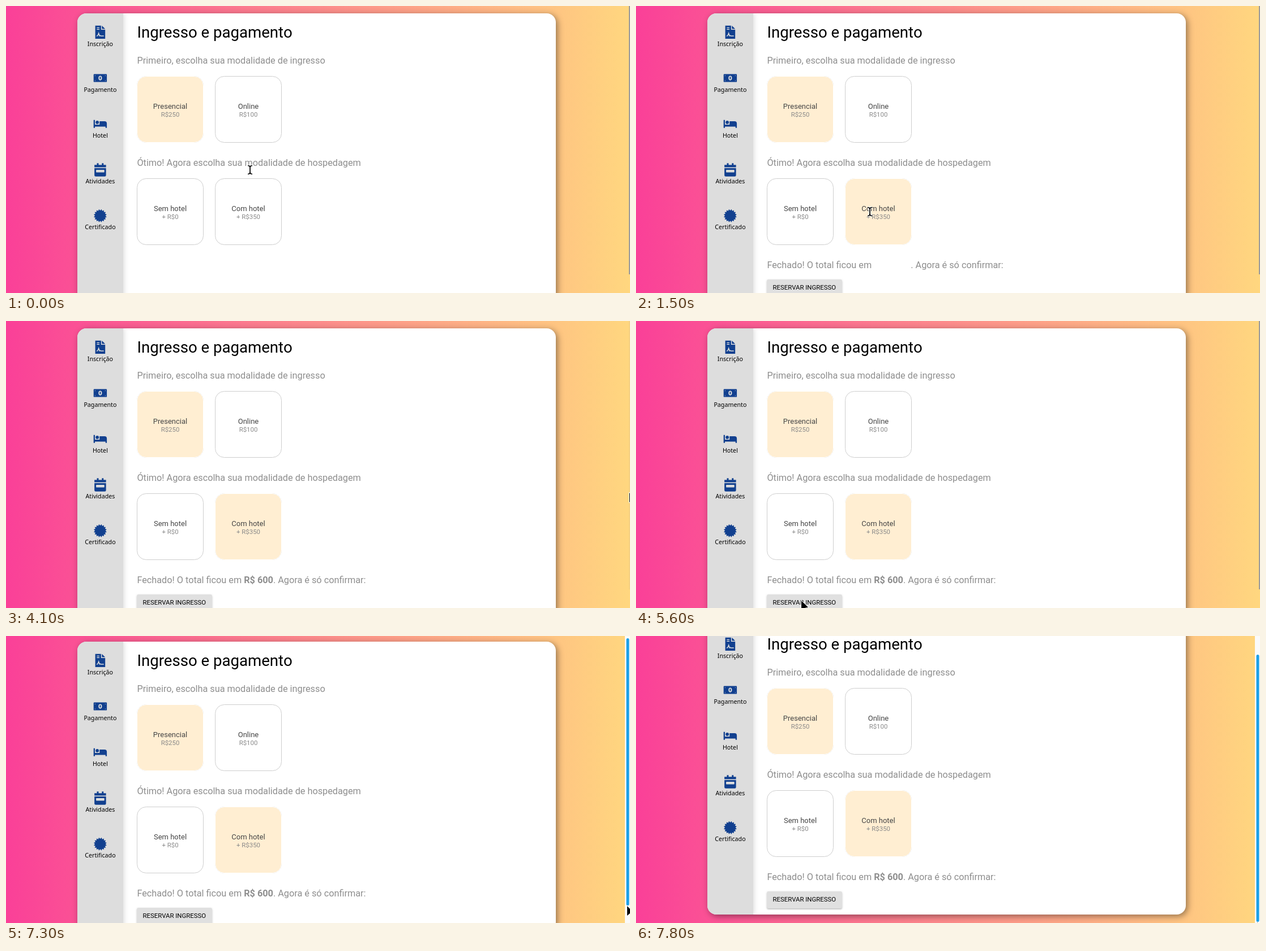
Recreate the animation shown at these times as an HTML page. Size 1102x508 px, loop 8000 ms.

```html
<!DOCTYPE html>
<html lang="pt">
<head>
<meta charset="utf-8">
<style>
  html, body { margin: 0; width: 100%; height: 100%; overflow: hidden; }
  #stage {
    position: fixed; inset: 0; overflow: clip;
    background: linear-gradient(to right, #fa4098, #ffd77f);
  }
  #page, svg { position: absolute; left: 0; top: 0; }
  #panel {
    position: absolute; left: 126px; top: 13px; width: 845px; height: 512px;
    background: #fff; border-radius: 16px; overflow: hidden;
    box-shadow: 3px 3px 12px rgba(0, 0, 0, .42);
  }
  #nav { width: 81px; height: 100%; background: #ddd; box-shadow: 2px 0 8px rgba(0, 0, 0, .13); }
  #button {
    position: absolute; left: 231px; top: 484px; width: 133px; height: 30px;
    background: #e0e0e0; border-radius: 3px;
    box-shadow: 0 2px 1px -2px rgba(0, 0, 0, .2), 0 2px 2px rgba(0, 0, 0, .14), 0 1px 4px rgba(0, 0, 0, .12);
  }
  text { font-family: Roboto, sans-serif; white-space: pre; }
  .title { font-size: 27.62px; }
  .step { font-size: 16.25px; fill: #8e8e8e; }
  .name { font-size: 13px; fill: #454545; }
  .price { font-size: 11.4px; fill: #898989; }
  .name, .price, .label, .action { text-anchor: middle; }
  .label { font: 10.7px "Noto Sans", sans-serif; }
  .action { font-size: 11.4px; }
  .border { fill: #fff; stroke: #cecece; }
  .chosen { fill: #ffeed2; stroke: #fff; }
  .icon { fill: #12408f; }
  .icon .hole { fill: #ddd; }
  .icon .line { fill: none; stroke: #ddd; stroke-width: 32; stroke-linecap: round; }
</style>
</head>
<body>
<div id="stage">
  <div id="page">
    <div id="panel"><div id="nav"></div></div>
    <div id="button" class="total"></div>
    <svg id="content" width="1102" height="541">
      <text class="title" x="231.4" y="56">Ingresso e pagamento</text>
      <text class="step" x="231.4" y="102">Primeiro, escolha sua modalidade de ingresso</text>
      <text class="step" x="231.4" y="283">Ótimo! Agora escolha sua modalidade de hospedagem</text>
      <g class="total">
        <text class="step" x="231.4" y="464">Fechado! O total ficou em <tspan id="sum" font-weight="700"></tspan><tspan id="rest">. Agora é só confirmar:</tspan></text>
        <text class="action" x="297.3" y="502">RESERVAR INGRESSO</text>
      </g>
    </svg>
  </div>
  <svg width="1102" height="508">
    <defs><path id="caret" d="M-4-7.5Q0-7.5 0-4V4Q0 7.5-4 7.5M4-7.5Q0-7.5 0-4V4Q0 7.5 4 7.5"/></defs>
    <rect id="track" x="1093" width="9" height="508" fill="#fafafa"/>
    <rect id="thumb"/>
    <g id="beam" fill="none">
      <use href="#caret" stroke="#fff" stroke-width="3.6"/>
      <use href="#caret" stroke="#000" stroke-width="1.7"/>
    </g>
    <path id="arrow" d="M0 0V17L4.5 13.2 12 11.8Z" stroke="#fff" stroke-width="2" stroke-linejoin="round" paint-order="stroke"/>
  </svg>
</div>
<script>
const $ = id => document.getElementById(id);
const add = markup => $('content').insertAdjacentHTML('beforeend', markup);
const clamp = v => Math.min(1, Math.max(0, v));
const smooth = v => (v = clamp(v), v * v * (3 - 2 * v));

// Sidebar icons, each on a grid 512 units high
const spikes = 16;
const star = Array.from({ length: 2 * spikes }, (_, i) => {
  const r = i % 2 ? 256 : 200, a = i * Math.PI / spikes;
  return [256 + r * Math.cos(a), 256 + r * Math.sin(a)];
}).join(' ');

const icons = [
  ['Inscrição', 384, `
    <path d="M0 0H224V160H384V512H0ZM256 0V128H384Z"/>
    <path class="line" d="M72 80H150M72 144H150M64 400Q100 400 132 296L164 392Q184 356 208 400H320"/>`],
  ['Pagamento', 640, `
    <rect y="64" width="640" height="384" rx="32"/>
    <path class="line" d="M72 136h1M568 136h1M72 376h1M568 376h1"/>
    <ellipse class="hole" cx="320" cy="256" rx="84" ry="112"/>
    <ellipse cx="320" cy="256" rx="30" ry="68"/>`],
  ['Hotel', 640, `
    <circle cx="176" cy="176" r="80"/>
    <path d="M0 64H64V288H288V128H528A112 112 0 0 1 640 240V448H576V384H64V448H0Z"/>`],
  ['Atividades', 448, `
    <path d="M96 0H160V64H288V0H352V64H448V160H0V64H96Z"/>
    <path d="M0 192H448V464Q448 512 400 512H48Q0 512 0 464Z"/>
    <rect class="hole" x="64" y="256" width="320" height="96" rx="16"/>`],
  ['Certificado', 512, `<polygon points="${star}"/>`]
];

icons.forEach(([label, width, shape], i) => {
  const y = 81.2 * i, scale = 23.4 / Math.max(width, 512);
  add(`<g class="icon" transform="translate(166.4 ${46.4 + y}) scale(${scale}) translate(${-width / 2} -256)">${shape}</g>
    <text class="label" x="166.4" y="${Math.floor(71 + y)}">${label}</text>`);
});

// Ticket options, two per row
const options = [
  ['Presencial', 'R$250'], ['Online', 'R$100'],
  ['Sem hotel', '+ R$0'], ['Com hotel', '+ R$350']
];

options.forEach(([name, price], i) => {
  const x = 231 + 138 * (i % 2), y = 124 + 181 * Math.floor(i / 2);
  const square = attrs =>
    `<rect x="${x + .5}" y="${y + .5}" width="117" height="117" rx="16" ${attrs}/>`;
  add(`${square('class="border"')}
    ${square(`class="chosen" id="chosen${i}" opacity="${i ? 0 : 1}"`)}
    <text class="name" x="${x + 59}" y="${y + 58}">${name}</text>
    <text class="price" x="${x + 59}" y="${y + 72}">${price}</text>`);
});

// Pointer moves; it rests in between
const moves = [
  { from: 0, to: 100, x: 413, y: 364 },
  { from: 1500, to: 2300, x: 523, y: 387 },
  { from: 2300, to: 2700, x: 714, y: 359 },
  { from: 3300, to: 3500, x: 1101, y: 304 },
  { from: 4500, to: 5000, x: 1101, y: 319 },
  { from: 5100, to: 5400, x: 339, y: 488 },
  { from: 5500, to: 5600, x: 292, y: 495 },
  { from: 5600, to: 5800, x: 324, y: 484 },
  { from: 5900, to: 6200, x: 1078, y: 410 },
  { from: 6300, to: 6700, x: 1097, y: 475 }
];

function pointer(t) {
  let x = 431, y = 290;
  for (const move of moves) {
    const k = clamp((t - move.from) / (move.to - move.from));
    x += (move.x - x) * k;
    y += (move.y - y) * k;
  }
  return [x, y];
}

const set = (id, attrs) => {
  for (const key in attrs) $(id).setAttribute(key, attrs[key]);
};

function draw(t) {
  const scroll = Math.round(32 * smooth((t - 7180) / 620));
  $('page').style.transform = `translateY(${-scroll}px)`;

  set('chosen3', { opacity: clamp((t - 400) / 300) });
  for (const el of document.querySelectorAll('.total')) {
    el.style.visibility = t >= 1500 ? 'visible' : 'hidden';
  }
  const loaded = t >= 1800;
  $('sum').textContent = loaded ? 'R$ 600' : '';
  set('rest', { dx: loaded ? 0 : 65 });

  const wide = t >= 6500;
  const faded = t < 5200 ? clamp((t - 3600) / 560) : 0;
  set('track', { opacity: wide ? 1 : 0 });
  set('thumb', {
    x: wide ? 1095.5 : 1100, y: scroll + (wide ? 1 : 0),
    width: wide ? 5 : 2, height: wide ? 473 : 475, rx: wide ? 2.5 : 0,
    fill: t >= 7300 ? '#1b9fe8' : '#999', opacity: 1 - faded
  });

  const [x, y] = pointer(t);
  const isBeam = t < 1600;
  const transform = `translate(${x} ${y + scroll})`;
  set('beam', { transform, opacity: isBeam ? 1 : 0 });
  set('arrow', { transform, opacity: isBeam ? 0 : 1 });
}

// The picture advances ten times a second
const start = performance.now();
function tick() {
  draw(Math.floor((performance.now() - start) % 8000 / 100) * 100);
  requestAnimationFrame(tick);
}
tick();
</script>
</body>
</html>
```
